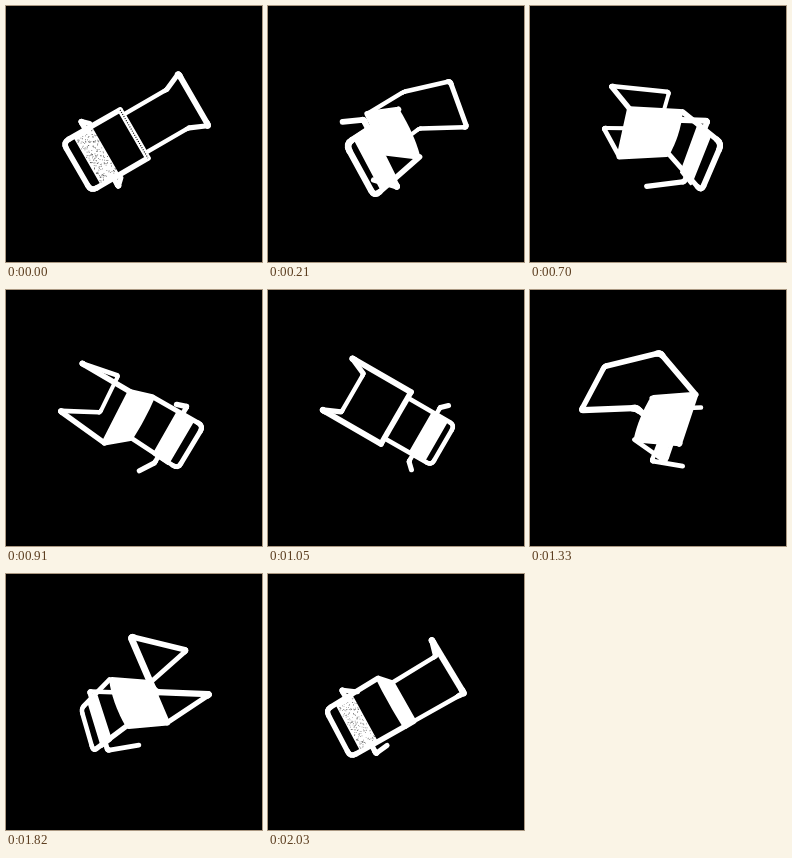
Animation, 256 px wide and 256 px high, one loop 2100 ms. Source, as an HTML page:

```html
<!DOCTYPE html>
<html lang="en">
<head>
<meta charset="utf-8">
<title>Turning chair</title>
<style>
  html, body { margin: 0; width: 100%; height: 100%; overflow: hidden; background: #000; }
  svg { display: block; width: 100vw; height: 100vh; }
</style>
</head>
<body>
<svg id="stage" viewBox="0 0 256 256">
  <g id="panels" fill="#fff" stroke="#fff" stroke-linejoin="round"></g>
  <g id="tubes" stroke="#fff" stroke-linecap="round"></g>
  <g id="details"></g>
</svg>
<script>
const STEP = 70, STEPS = 30;
const DISTANCE = 240, CENTRE = 128, TUBE = 5;
const TILT = Math.PI / 6;
const HALF = 25.4, FLOOR = 58, TOP = -59.5, FRONT = -36, REAR = 21, HEEL = 37.3, PAD = 18;

const add = (parent, tag, attrs = {}) => {
  const el = document.createElementNS('http://www.w3.org/2000/svg', tag);
  set(el, attrs);
  return document.getElementById(parent).appendChild(el);
};
const set = (el, attrs) => {
  for (const key in attrs) el.setAttribute(key, attrs[key]);
};
const mix = (a, b, k) => a.map((value, i) => value + (b[i] - value) * k);

// Chair points are [along its height, across its width, depth].
function project([u, v, w], angle) {
  const x = u * Math.cos(TILT) + v * Math.sin(TILT);
  const y = v * Math.cos(TILT) - u * Math.sin(TILT);
  const c = Math.cos(angle), s = Math.sin(angle);
  const scale = DISTANCE / (DISTANCE - (w * c - x * s));
  return [CENTRE + (x * c + w * s) * scale, CENTRE + y * scale, scale];
}

function roundCorners(points, radius) {
  const out = [points[0]];
  for (let i = 1; i < points.length - 1; i++) {
    const p = points[i];
    const [from, to] = [points[i - 1], points[i + 1]].map(q =>
      mix(p, q, Math.min(0.5, radius / Math.hypot(...p.map((a, k) => a - q[k])))));
    for (let k = 0; k <= 4; k++) out.push(mix(mix(from, p, k / 4), mix(p, to, k / 4), k / 4));
  }
  out.push(points[points.length - 1]);
  return out;
}

const arm = side => [[-36, side * HALF, 22], [-36, side * 34, 22], [-36, side * 34, -20]];
const base = [
  [0, -HALF, FRONT], [FLOOR, -HALF, FRONT], [FLOOR, -HALF, HEEL],
  [FLOOR, HALF, HEEL], [FLOOR, HALF, FRONT], [0, HALF, FRONT]
];
const back = [[0, -HALF, REAR], [TOP, -HALF, 23], [TOP, HALF, 23], [0, HALF, REAR]];

const segments = [[base, 3], [back, 6], [arm(-1), 2], [arm(1), 2]].flatMap(([points, radius]) => {
  const path = roundCorners(points, radius);
  return path.slice(1).map((to, i) => ({ from: path[i], to, el: add('tubes', 'line') }));
});

const rearEdge = Array.from({ length: 9 }, (_, i) => {
  const k = i / 4 - 1;
  return [0, k * HALF, REAR - 3 * k * k];
});
const panels = [
  { points: [[0, HALF, FRONT], [0, -HALF, FRONT], ...rearEdge], width: 5.6 },
  { points: [[-31.5, -HALF, PAD], [-49, -HALF, PAD], [-49, HALF, PAD], [-31.5, HALF, PAD]], width: 2.5 }
].map(panel => ({ ...panel, el: add('panels', 'polygon', { 'stroke-width': panel.width }) }));

const seam = add('details', 'line', { stroke: '#000', 'stroke-width': 1.2, 'stroke-dasharray': '1 1.4' });
const weave = add('details', 'path', { fill: '#555' });

let seed = 7;
const random = () => (seed = seed * 16807 % 2147483647) / 2147483647;
const holes = Array.from({ length: 190 }, () => [-31 - random() * 18, (random() * 2 - 1) * 23, PAD]);

function draw(angle) {
  for (const { from, to, el } of segments) {
    const [x1, y1, a] = project(from, angle);
    const [x2, y2, b] = project(to, angle);
    set(el, { x1, y1, x2, y2, 'stroke-width': TUBE * (a + b) / 2 });
  }
  for (const { points, el } of panels) {
    el.setAttribute('points', points.map(p => project(p, angle).slice(0, 2).join()).join(' '));
  }

  const facing = Math.cos(angle);
  const [x1, y1] = project([0, -HALF, REAR], angle);
  const [x2, y2] = project([0, HALF, REAR], angle);
  set(seam, { x1, y1, x2, y2, visibility: facing > 0.99 ? 'visible' : 'hidden' });

  const size = 0.8 * Math.max(0, (facing - 0.85) / 0.15);
  weave.setAttribute('d', size ? holes.map(p => {
    const [x, y] = project(p, angle);
    return `M${x} ${y}h${size}v${size}h${-size}z`;
  }).join('') : '');
}

const start = performance.now();
function tick() {
  const step = Math.floor((performance.now() - start) / STEP) % STEPS;
  draw(step / STEPS * 2 * Math.PI);
  requestAnimationFrame(tick);
}
tick();
</script>
</body>
</html>
```
